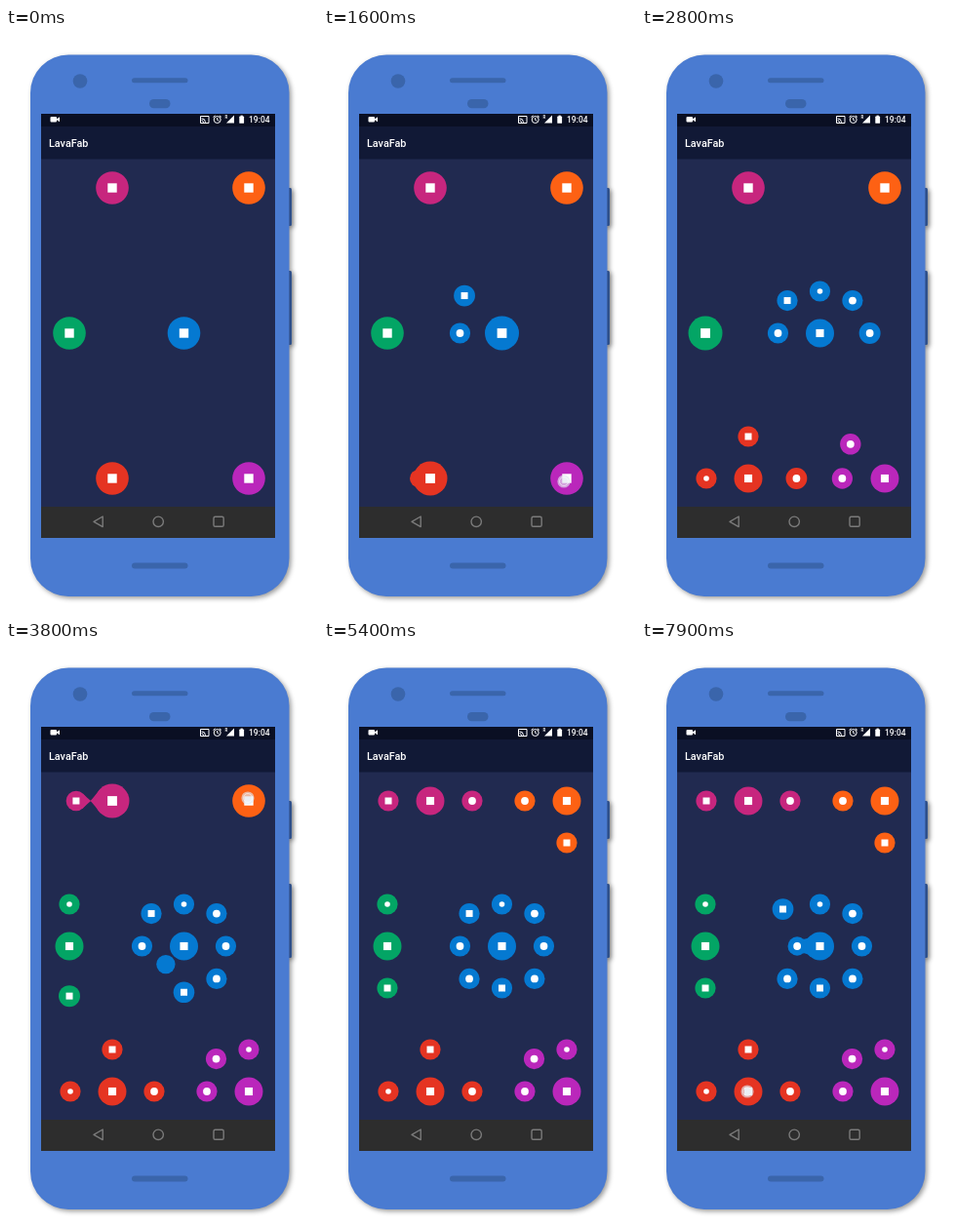
An HTML page with a canvas that plays this animation: 320 by 600 pixels, repeating every 8000 ms.

```html
<!DOCTYPE html>
<html lang="en">
<head>
<meta charset="utf-8">
<title>LavaFab</title>
<style>
html, body { margin: 0; width: 100%; height: 100%; overflow: hidden; background: #fff; }
canvas { display: block; width: 320px; height: 600px; }
</style>
</head>
<body>
<canvas id="stage" width="320" height="600"></canvas>
<script>
const ctx = document.getElementById('stage').getContext('2d');
const LOOP = 8000;
const STAGGER = 420;
const CLOSE_STAGGER = 350;
const TRAVEL = 700;
const REACH = 43;

// A child's distance over time: shoots out, overshoots, settles.
const SPRING = [[0, 0], [60, .27], [100, .55], [150, .86], [230, 1.05],
  [330, 1.21], [420, 1.15], [520, 1.1], [600, 1.03], [700, 1]];

// Children are listed by angle in degrees and kind of mark.
const FABS = [
  { x: 109, y: 164, color: '#c7267e', tap: 3200, open: 3650,
    kids: [[180, 'square'], [0, 'dot']] },
  { x: 249, y: 164, color: '#fd6114', tap: 3800, open: 4240,
    kids: [[180, 'dot'], [90, 'square']] },
  { x: 65, y: 313, color: '#03a565', tap: 2550, open: 3020,
    kids: [[270, 'small'], [90, 'square']] },
  { x: 182.5, y: 313, color: '#0579d1', tap: 300, open: 760, shrink: 1650, close: 7300,
    kids: [[180, 'dot'], [225, 'square'], [270, 'small'], [315, 'dot'],
      [0, 'dot'], [45, 'dot'], [90, 'square'], [135, 'dot']] },
  { x: 109, y: 462, color: '#e53422', tap: 1050, open: 1540,
    kids: [[180, 'small'], [270, 'square'], [0, 'dot']] },
  { x: 249, y: 462, color: '#ba27bb', tap: 1600, open: 2150,
    kids: [[180, 'dot'], [225, 'dot'], [270, 'small']] }
];

const TOUCHES = [[300, 183, 312], [1050, 109, 463], [1600, 246, 465], [2550, 65, 313],
  [3200, 109, 164], [3750, 248, 161], [6900, 187, 306], [7880, 108, 462]];

const clamp = v => Math.max(0, Math.min(1, v));
const mix = (a, b, k) => a + (b - a) * k;
const ease = k => k * k * (3 - 2 * k);

function spring(u) {
  if (u <= 0) return 0;
  const i = SPRING.findIndex(key => key[0] > u);
  if (i < 0) return 1;
  const [t0, v0] = SPRING[i - 1], [t1, v1] = SPRING[i];
  return mix(v0, v1, (u - t0) / (t1 - t0));
}

function disc(x, y, r, color) {
  ctx.fillStyle = color;
  ctx.beginPath();
  ctx.arc(x, y, r, 0, 7);
  ctx.fill();
}

function box(x, y, w, h, color, r = 0) {
  ctx.fillStyle = color;
  ctx.beginPath();
  ctx.roundRect(x, y, w, h, r);
  ctx.fill();
}

function poly(points, color, stroke) {
  ctx.beginPath();
  points.forEach(p => ctx.lineTo(...p));
  ctx.closePath();
  if (stroke) { ctx.strokeStyle = color; ctx.stroke(); }
  else { ctx.fillStyle = color; ctx.fill(); }
}

function text(str, x, y, size) {
  ctx.font = `500 ${size}px Roboto, sans-serif`;
  ctx.fillStyle = '#fff';
  ctx.fillText(str, x, y);
}

function drawStatusBar() {
  box(36, 88, 240, 13, '#0a0f23');
  box(45.5, 91, 6.5, 5.5, '#fff', 1);
  poly([[52, 93.2], [55, 91.2], [55, 96.3], [52, 94.3]], '#fff');

  ctx.strokeStyle = '#fff';
  ctx.lineWidth = 1;
  ctx.strokeRect(199.5, 90.5, 8.5, 7);
  ctx.beginPath();
  for (const r of [2, 4]) {
    ctx.moveTo(200.5, 96.8 - r);
    ctx.arc(200.5, 96.8, r, -Math.PI / 2, 0);
  }
  ctx.moveTo(220.2, 94);
  ctx.arc(216.7, 94, 3.5, 0, 7);
  ctx.moveTo(216.7, 92);
  ctx.lineTo(216.7, 94.3);
  ctx.lineTo(218.3, 95.2);
  ctx.moveTo(212.5, 91.4);
  ctx.lineTo(214.5, 89.8);
  ctx.moveTo(218.9, 89.8);
  ctx.lineTo(220.9, 91.4);
  ctx.stroke();

  text('R', 224.5, 93, 4.5);
  poly([[226, 97.5], [234, 97.5], [234, 89.5]], '#fff');
  box(239.3, 90.6, 4.8, 7.2, '#fff', .6);
  box(240.6, 89.6, 2.2, 1.5, '#fff');
  text('19:04', 249, 97, 8.5);
}

function drawNavBar() {
  box(36, 491, 240, 32, '#2d2d2d');
  ctx.lineWidth = 1.4;
  ctx.lineJoin = 'round';
  poly([[90, 506.3], [99.2, 501], [99.2, 511.6]], '#7b7b7b', true);
  ctx.beginPath();
  ctx.arc(156.2, 506.3, 5.2, 0, 7);
  ctx.stroke();
  ctx.beginPath();
  ctx.roundRect(213, 501.3, 10.2, 10, 1.6);
  ctx.stroke();
}

function drawPhone() {
  box(0, 0, 320, 600, '#fff');
  ctx.save();
  ctx.shadowColor = 'rgba(0,0,0,.4)';
  ctx.shadowBlur = 5;
  ctx.shadowOffsetX = 2;
  ctx.shadowOffsetY = 2;
  box(287, 164, 6, 39, '#3e69b4', 1.5);
  box(287, 249, 6, 76, '#3e69b4', 1.5);
  box(25, 27.5, 265.5, 555.5, '#4a7bd1', 39);
  ctx.restore();

  const dark = '#3a65ab';
  disc(76, 54.5, 7.3, dark);
  box(129, 51.3, 57.5, 5, dark, 2.5);
  box(147, 73, 21.5, 9.3, dark, 4.6);
  box(129, 548.5, 57.5, 6, dark, 3);

  box(36, 101, 240, 34, '#111936');
  box(36, 134.5, 240, 357, '#212a50');
  drawStatusBar();
  text('LavaFab', 44, 122, 10.8);
  drawNavBar();
}

function drawMark(x, y, kind) {
  if (kind === 'square') box(x - 3.5, y - 3.5, 7, 7, '#fff');
  else disc(x, y, kind === 'small' ? 2.8 : 3.9, '#fff');
}

// Liquid bridge along the x axis, which snaps into two pointed tips.
function drawBridge(dist, mainR, kidR) {
  if (dist < 33) {
    const w0 = mainR * .75, w1 = kidR * .78;
    const x0 = mainR * .66, x1 = dist - kidR * .62;
    if (x1 <= x0) return;
    const mid = (x0 + x1) / 2, waist = Math.min(w0, w1) * clamp(1.5 - dist / 38);
    ctx.beginPath();
    ctx.moveTo(x0, -w0);
    ctx.quadraticCurveTo(mid, -waist, x1, -w1);
    ctx.lineTo(x1, w1);
    ctx.quadraticCurveTo(mid, waist, x0, w0);
    ctx.fill();
  } else if (dist < 41) {
    const pull = (41 - dist) / 4;
    const tip = (from, r, side) => {
      const base = from + side * r * .7, end = from + side * (r + 5 * clamp(pull));
      ctx.beginPath();
      ctx.moveTo(base, -r * .71);
      ctx.quadraticCurveTo(mix(base, end, .6), -r * .25, end, 0);
      ctx.quadraticCurveTo(mix(base, end, .6), r * .25, base, r * .71);
      ctx.fill();
    };
    tip(0, mainR, 1);
    tip(dist, kidR, -1);
  }
}

function mainRadius(fab, t) {
  const swell = ease(clamp((t - fab.tap - 80) / 180));
  const shrink = ease(clamp((t - (fab.shrink || fab.open + 170)) / 230));
  return mix(mix(16.8, 17.5, swell), 14.5, shrink);
}

function drawKid(fab, index, mainR, t) {
  const [degrees, kind] = fab.kids[index];
  const opened = t - fab.open - index * STAGGER;
  const closed = fab.close ? t - fab.close - index * CLOSE_STAGGER : 0;
  const closing = closed > 0;
  const u = closing ? TRAVEL - closed : opened;
  if (u <= 0) return;

  const p = spring(u);
  const angle = degrees * Math.PI / 180;
  const diagonal = degrees % 90 !== 0;
  const dist = p * (diagonal ? REACH * 1.1 : REACH);
  const r = 8.5 + 2.1 * p;
  const x = fab.x + dist * Math.cos(angle), y = fab.y + dist * Math.sin(angle);

  disc(x, y, r, fab.color);
  if (!diagonal && u < 200) {
    ctx.save();
    ctx.translate(fab.x, fab.y);
    ctx.rotate(angle);
    drawBridge(dist, mainR, r);
    ctx.restore();
  }
  if (p > (closing ? .4 : .7)) drawMark(x, y, kind);
}

function drawFab(fab, t) {
  const r = mainRadius(fab, t);
  fab.kids.forEach((_, i) => drawKid(fab, i, r, t));
  disc(fab.x, fab.y, r, fab.color);
  const side = r * .56;
  box(fab.x - side / 2, fab.y - side / 2, side, side, '#fff');
}

function drawTouch([start, x, y], t) {
  if (t < start || t > start + 200) return;
  disc(x, y, 6.6, 'rgba(225,230,240,.65)');
  ctx.lineWidth = 1;
  ctx.strokeStyle = 'rgba(255,255,255,.55)';
  ctx.beginPath();
  ctx.arc(x, y, 4.5, 0, 7);
  ctx.stroke();
}

function render(now) {
  const t = now % LOOP;
  drawPhone();
  FABS.forEach(fab => drawFab(fab, t));
  TOUCHES.forEach(touch => drawTouch(touch, t));
}

function tick() {
  render(performance.now());
  requestAnimationFrame(tick);
}
tick();
</script>
</body>
</html>
```
